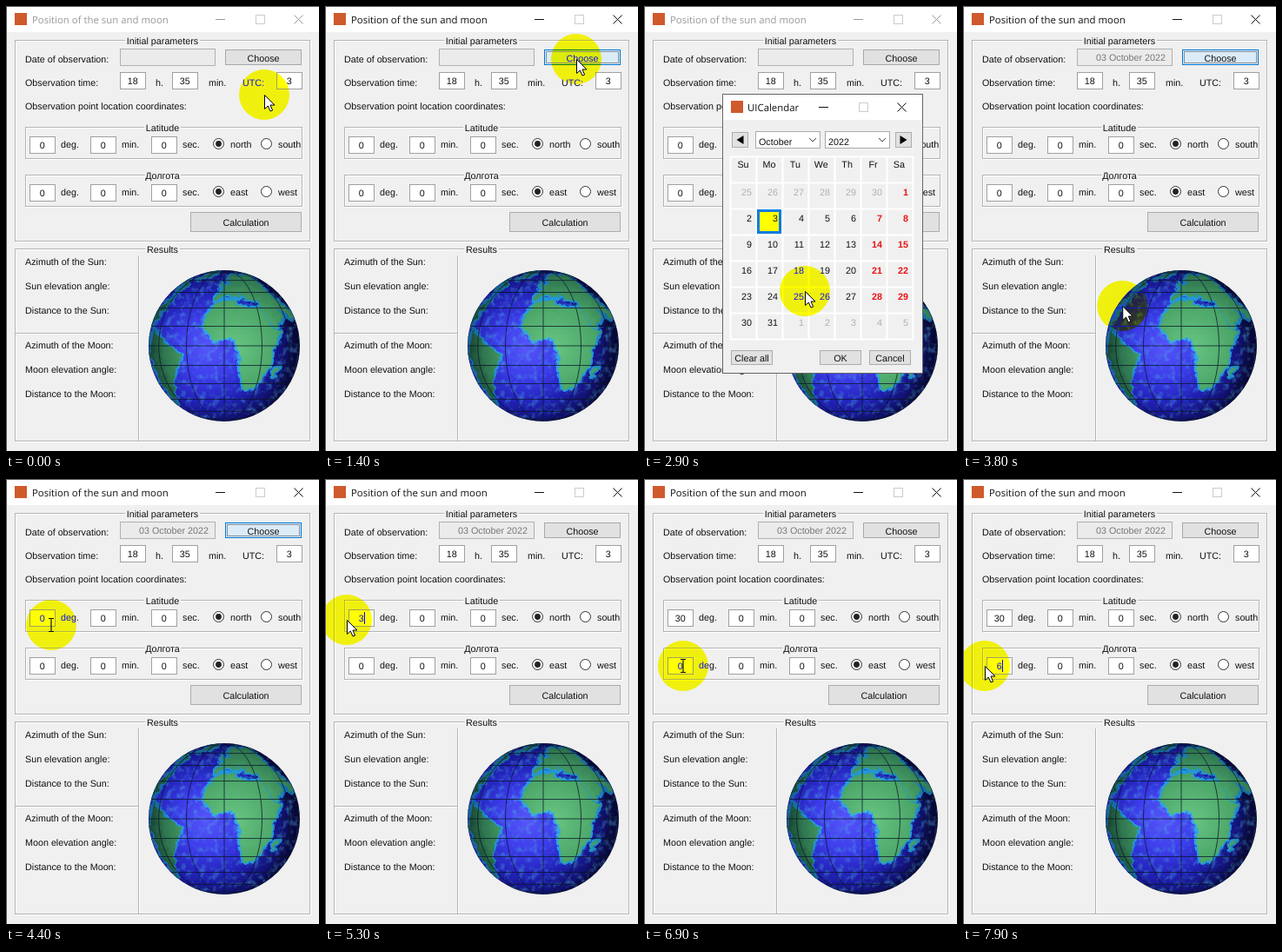
An HTML page for the animation above (8 s loop, 360 by 512 pixels).

```html
<!DOCTYPE html>
<html lang="en">
<head>
<meta charset="utf-8">
<title>Position of the sun and moon</title>
<style>
html, body { margin: 0; height: 100%; overflow: hidden; background: #f0f0f0; }
svg { display: block; }
text { font: 10.75px "Liberation Sans", Arial, sans-serif; fill: #111; white-space: pre; text-rendering: geometricPrecision; }
.title { font: 11.4px "Open Sans", "Noto Sans", sans-serif; }
.mid { text-anchor: middle; }
.end { text-anchor: end; }
.legend { text-anchor: middle; paint-order: stroke; stroke: #f0f0f0; stroke-width: 5px; }
.red { fill: #e81414; font-weight: bold; }
.pale { fill: #b0b0b0; }
#halo { fill: #00f; mix-blend-mode: difference; }
</style>
</head>
<body>
<svg id="stage" width="360" height="512" viewBox="0 0 360 512"></svg>
<script>
const range = (n, f) => Array.from({ length: n }, (_, i) => f(i)).join('');
const text = (x, y, s, cls = '', extra = '') => `<text x="${x}" y="${y}" class="${cls}" ${extra}>${s}</text>`;
const box = (x, y, w, h, fill, stroke) =>
  `<rect x="${x + .5}" y="${y + .5}" width="${w - 1}" height="${h - 1}" fill="${fill}" stroke="${stroke}"/>`;
const line = (d, stroke, w = 1, extra = '') => `<path d="${d}" fill="none" stroke="${stroke}" stroke-width="${w}" ${extra}/>`;
const button = (x, y, w, h, s, fill = '#e1e1e1', edge = '#adadad') =>
  box(x, y, w, h, fill, edge) + text(x + w / 2, y + h / 2 + 4.5, s, 'mid');
const field = (x, y, s) => box(x, y, 30, 20, '#fff', '#a0a0a0') + text(x + 14.7, y + 14, s, 'mid');
const panel = (x, y, w, h, s) =>
  box(x + 1, y + 1, w, h, 'none', '#fff') + box(x, y, w, h, 'none', '#b4b4b4') + text(180, y + 4.5, s, 'legend');
const windowButtons = (x, y, color) =>
  line(`M${x} ${y + .5}h11M${x + 90.5} ${y - 4.5}l10 10m0-10l-10 10`, color) +
  box(x + 46, y - 5, 11, 11, 'none', '#ccc');
const appIcon = (x, y) => `<rect x="${x}" y="${y}" width="14" height="14" fill="#cf5a2c"/>`;

// Globe: orthographic view centred on 0 deg N, 0 deg E; points are lon, lat
const CX = 251, CY = 391, R = 87, RAD = Math.PI / 180;
const coasts = [
  [-6,36, 10,37, 11,33, 20,31, 32,31, 35,27, 43,12, 51,12, 40,-4, 40,-15, 35,-20, 33,-27, 27,-34, 19,-35,
    12,-18, 13,-8, 9,-1, 9,4, 4,6, -8,4, -17,15, -16,23, -10,30],
  [-9,37, -9,43, -1,44, -4,48, 4,52, 9,57, 6,60, 14,68, 25,71, 60,69, 90,73, 90,25, 72,20, 66,25, 50,30,
    59,22, 44,13, 35,28, 35,36, 23,38, 13,45, 16,39, 3,42],
  [-35,-7, -48,-26, -66,-45, -75,-50, -72,-30, -81,-5, -72,12, -50,1],
  [-90,15, -81,27, -60,47, -56,53, -78,62, -90,60],
  [-44,60, -22,70, -20,80, -65,78],
  [-5,50, 1,52, -4,58],
  [44,-25, 50,-16, 44,-18]
];
const project = ([lon, lat]) =>
  [CX + R * Math.cos(lat * RAD) * Math.sin(lon * RAD), CY - R * Math.sin(lat * RAD)].map(v => v.toFixed(1)).join(' ');
const coastPath = coasts.map(c =>
  'M' + c.flatMap((v, i) => i % 2 ? [] : [project([v, c[i + 1]])]).join('L') + 'Z').join('');
const disc = extra => `<circle cx="${CX}" cy="${CY}" r="${R}" ${extra}/>`;
const gradient = (id, cx, stops) =>
  `<radialGradient id="${id}" gradientUnits="userSpaceOnUse" cx="${cx}" cy="${CY + 2}" r="100">` +
  stops.map(([o, c]) => `<stop offset="${o}" stop-color="${c}"/>`).join('') + '</radialGradient>';

function globe() {
  const parallels = range(11, i => {
    const a = (i * 15 - 75) * RAD, half = R * Math.cos(a);
    return `M${CX - half} ${CY + R * Math.sin(a)}h${2 * half}`;
  });
  const meridians = [30, 60, 90].map(a =>
    `<ellipse cx="${CX}" cy="${CY}" rx="${R * Math.sin(a * RAD)}" ry="${R}" fill="none" stroke="#0a1428"/>`).join('');
  return `<defs>
    ${gradient('sea', 232, [[0, '#5656fa'], [.35, '#3c3cea'], [.65, '#2020b4'], [.88, '#10106c'], [1, '#080838']])}
    ${gradient('land', 262, [[0, '#68c682'], [.5, '#4ba568'], [.8, '#2f7650'], [1, '#143a2c']])}
    ${gradient('shelf', 251, [[0, '#38b0f0'], [.6, '#2296d8'], [1, '#0c4878']])}
    <clipPath id="ball">${disc('')}</clipPath>
    <filter id="rough"><feTurbulence type="fractalNoise" baseFrequency=".16" numOctaves="2" seed="4"/>
      <feDisplacementMap in="SourceGraphic" scale="7" xChannelSelector="R" yChannelSelector="G"/></filter>
    <filter id="relief"><feTurbulence type="fractalNoise" baseFrequency=".13" numOctaves="3" seed="9"/>
      <feColorMatrix values="0 0 0 0 .08  0 0 0 0 .4  0 0 0 0 .75  2.6 0 0 0 -1.25"/>
      <feComposite in2="SourceGraphic" operator="in"/></filter>
  </defs>
  <g clip-path="url(#ball)">${disc('fill="url(#sea)"')}${disc('filter="url(#relief)" opacity=".55"')}
    <g filter="url(#rough)">
      <path d="${coastPath}" fill="none" stroke="url(#shelf)" stroke-width="5" stroke-linejoin="round"/>
      <path d="${coastPath}" fill="url(#land)"/>
    </g>
    <g opacity=".75">${line(parallels + `M${CX} ${CY - R}v${2 * R}`, '#0a1428')}${meridians}</g>
  </g>`;
}

function coordinates(y, name, sides) {
  const units = ['deg.', 'min.', 'sec.'];
  return panel(22, y, 319, 37, name) +
    range(3, i => (i ? field(27 + 70 * i, y + 11, '0') : '') + text(63 + 70 * i, y + 24, units[i])) +
    range(2, i => `<circle cx="${244.5 + 55 * i}" cy="${y + 19.5}" r="6" fill="#fff" stroke="#333"/>` +
      (i ? '' : `<circle cx="244.5" cy="${y + 19.5}" r="3.4" fill="#222"/>`) +
      text(258 + 55 * i, y + 24, sides[i]));
}

function form() {
  const results = ['Azimuth of the Sun:', 'Sun elevation angle:', 'Distance to the Sun:',
    'Azimuth of the Moon:', 'Moon elevation angle:', 'Distance to the Moon:'];
  return '<rect width="360" height="512" fill="#f0f0f0"/><rect width="360" height="30" fill="#fff"/>' +
    line('M.5 512V.5H360', '#555') + appIcon(10, 8) +
    panel(10, 39, 340, 232, 'Initial parameters') + panel(10, 279, 340, 222, 'Results') +
    text(22, 65, 'Date of observation:') + text(22, 92, 'Observation time:') +
    text(22, 119, 'Observation point location coordinates:') +
    field(131, 76, '18') + text(172, 92, 'h.') + field(191, 76, '35') + text(233, 92, 'min.') +
    text(272, 92, 'UTC:') + field(311, 76, '3') +
    coordinates(139, 'Latitude', ['north', 'south']) + coordinates(194, 'Долгота', ['east', 'west']) +
    button(212, 237, 128, 23, 'Calculation') +
    line('M153.5 287V500M11 377.5H152', '#fff') + line('M152.5 287V500M11 376.5H152', '#b4b4b4') +
    results.map((s, i) => text(22, 298 + 28 * i + (i > 2 ? 12 : 0), s)).join('');
}

function calendar() {
  const combo = (x, s) => box(x, 144, 75, 20, '#fff', '#aaa') + text(x + 4, 160, s) +
    line(`M${x + 62} 152l4 4l4-4`, '#444');
  const arrow = (x, dir) => button(x, 145, 19, 18, '') +
    `<path d="M${x + 9.5 + 4 * dir} 154l${-8 * dir}-5v10z" fill="#000"/>`;
  const day = i => {
    const n = i - 5, col = i % 7, inMonth = n > 0 && n < 32;
    const cls = !inMonth ? 'pale' : col > 4 ? 'red' : '';
    return text(124 + 30 * col, 218 + 30 * Math.floor(i / 7), n < 1 ? n + 30 : n > 31 ? n - 31 : n, 'end ' + cls);
  };
  return box(90, 101, 231, 322, '#f0f0f0', '#666') + '<rect x="91" y="102" width="229" height="29" fill="#fff"/>' +
    appIcon(100, 109) + text(119, 121, 'UICalendar', 'title') + windowButtons(201, 116, '#111') +
    arrow(101, -1) + combo(128, 'October') + combo(208, '2022') + arrow(289, 1) +
    line(range(8, i => `M${99.5 + 30 * i} 173V383M99 ${173.5 + 30 * i}H310`), '#fff', 2) +
    '<rect x="132.500" y="236" width="23" height="23" fill="#ff0"/>' +
    '<rect id="picked" x="131.500" y="235.500" width="25" height="25" fill="none" stroke="#0b7be0" stroke-width="3"/>' +
    ['Su', 'Mo', 'Tu', 'We', 'Th', 'Fr', 'Sa'].map((s, i) => text(114 + 29.9 * i, 186, s, 'mid')).join('') +
    range(42, day) +
    button(100, 396, 48, 17, 'Clear all') + button(202, 396, 48, 17, 'OK') + button(259, 396, 48, 17, 'Cancel');
}

stage.innerHTML = form() + globe() + '<g id="live"></g><g id="dialog">' + calendar() + '</g>' +
  '<circle id="halo" r="29"/><g id="pointer">' +
  '<path id="arrowTip" d="M.5.5V16.500L4.300 13L7 19L9.600 18L7 12H12Z" fill="#fff" stroke="#000"/>' +
  line('M-3-7.500h2.500l.5.500l.5-.500H3M0-7V7M-3 7.500h2.500l.5-.500l.5.500H3', '#111', 1.2, 'id="beam"') + '</g>';

// Pointer route: time, x, y
const route = [
  [0, 297, 102], [900, 289, 61], [1500, 289, 61], [1800, 273, 94], [2300, 146, 247], [2600, 146, 247],
  [2900, 185, 328], [3300, 227, 404], [3600, 227, 404], [4400, 52, 168], [4700, 50, 162], [5100, 25, 162],
  [5700, 25, 162], [6200, 47, 203], [6600, 50, 215], [6800, 50, 215], [7300, 25, 215], [8000, 25, 215]
];
function pointerAt(t) {
  const i = route.findIndex(k => k[0] > t), [t0, x0, y0] = route[i - 1], [t1, x1, y1] = route[i];
  const p = (t - t0) / (t1 - t0);
  return [x0 + (x1 - x0) * p, y0 + (y1 - y0) * p];
}

// Latest value whose start time has passed
const stepAt = (t, steps) => steps.filter(s => s[0] <= t).pop()[1];

const looks = {
  normal: ['#e1e1e1', '#a4a9b0'], hover: ['#e5f1fb', '#0078d7'], focus: ['#dcebf8', '#0078d7']
};
function chooseButton(look) {
  return button(252, 50, 88, 18, 'Choose', ...looks[look]) +
    (look == 'focus' ? line('M254.500 52.500h83v13h-83z', '#333', 1, 'stroke-dasharray="1 1"') : '');
}
function entry(y, s, mode) {
  const end = 41.7 + s.length * 3;
  return field(27, y, s) +
    (mode == 'selected' ? '<rect x="38" y="' + (y + 3) + '" width="7" height="14" fill="#0078d7"/>' +
      text(41.7, y + 14, s, 'mid', 'style="fill:#fff"') : '') +
    (mode == 'caret' ? line(`M${Math.round(end) + .5} ${y + 3}v14`, '#000') : '');
}

function draw(t) {
  const open = t >= 1600 && t < 3500, active = t >= 900 && !open, [x, y] = pointerAt(t);
  const ink = active ? '#111' : '#999';
  const look = stepAt(t, [[0, 'normal'], [600, 'hover'], [1000, 'focus'], [1600, 'hover'], [2000, 'normal'],
    [3500, 'focus'], [4700, 'normal']]);
  live.innerHTML = text(30, 20, 'Position of the sun and moon', 'title', `style="fill:${ink}"`) +
    windowButtons(241, 15, ink) + box(131, 49, 110, 20, '#ebebeb', '#b0b0b0') +
    text(193, 62.5, t < 3500 ? '' : '03 October 2022', 'mid', 'style="fill:#777"') + chooseButton(look) +
    entry(150, stepAt(t, [[0, '0'], [5300, '3'], [5500, '30']]),
      stepAt(t, [[0, ''], [4900, 'selected'], [5300, 'caret'], [6700, '']])) +
    entry(205, stepAt(t, [[0, '0'], [7600, ''], [7700, '6']]),
      stepAt(t, [[0, ''], [7000, 'selected'], [7600, 'caret']]));
  dialog.style.display = open ? '' : 'none';
  picked.style.display = t >= 2500 ? '' : 'none';

  const inEntry = t > 4000 && x > 27 && x < 57 && (y > 150 && y < 170 || y > 205 && y < 225);
  halo.setAttribute('cx', x);
  halo.setAttribute('cy', y);
  pointer.setAttribute('transform', `translate(${x} ${y})`);
  arrowTip.style.display = inEntry ? 'none' : '';
  beam.style.display = inEntry ? '' : 'none';
}

const start = performance.now();
let shown = -1;
function tick(now) {
  const t = Math.floor(Math.max(0, now - start) % 8000 / 100) * 100;
  if (t != shown) draw(shown = t);
  requestAnimationFrame(tick);
}
tick(start);
</script>
</body>
</html>
```
